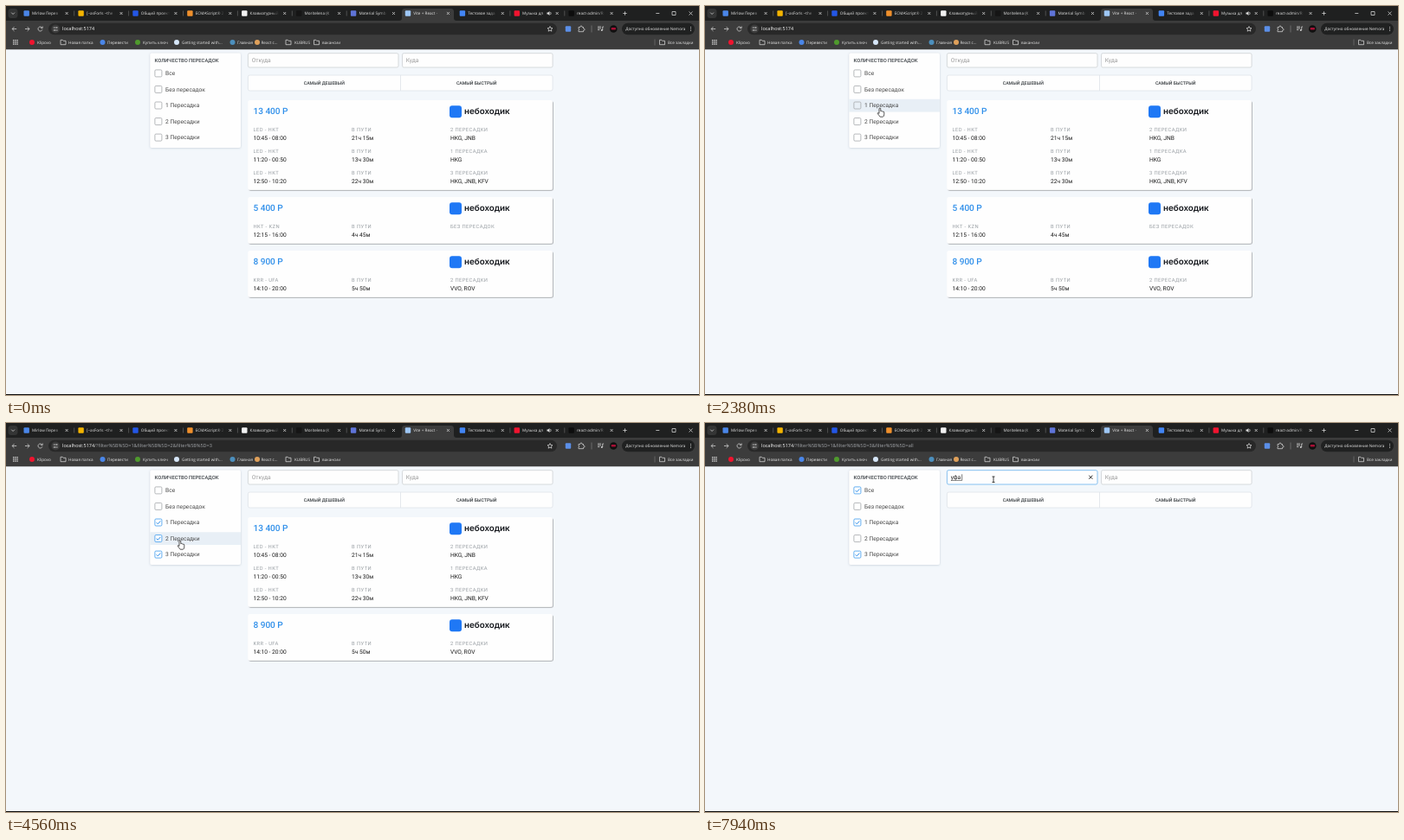
An HTML page for the animation above (8000 ms loop, 800 by 450 pixels).

```html
<!DOCTYPE html>
<html lang="ru">
<head>
<meta charset="utf-8">
<style>
html, body { margin: 0; width: 100%; height: 100%; overflow: hidden; background: #f3f7fb; }
svg { display: block; width: 800px; height: 450px; }
text { font-family: Roboto, sans-serif; font-size: 6.667px; text-rendering: geometricPrecision; white-space: pre; }
.ui text { font-family: "Open Sans", sans-serif; font-size: 4.65px; fill: #e6e6e6; }
.ui .url { font-size: 5.5px; fill: #fff; }
.line { fill: none; stroke: #d0d0d0; stroke-width: .8; }
.head { font-size: 5.83px; font-weight: 500; fill: #3c4146; }
.opt { fill: #4a4a4a; }
.hint { fill: #9a9a9a; }
.sort { font-size: 5.2px; font-weight: 500; fill: #33383c; text-anchor: middle; }
.price { font-size: 10.1px; font-weight: 500; fill: #2f8fea; }
.label { font-size: 5.83px; letter-spacing: .4px; fill: #999fa4; }
.value { fill: #1b1b1b; }
.brand { font-family: Inter, sans-serif; font-size: 9.8px; font-weight: 600; fill: #14171c; }
</style>
</head>
<body>
<svg viewBox="0 0 800 450">
  <defs>
    <filter id="soft" x="-10%" y="-10%" width="120%" height="125%">
      <feDropShadow dx="0" dy=".4" stdDeviation="1" flood-color="#62788c" flood-opacity=".35"/>
    </filter>
    <filter id="lift" x="-5%" y="-10%" width="110%" height="125%">
      <feDropShadow dx=".8" dy="1" stdDeviation=".6" flood-color="#000" flood-opacity=".32"/>
    </filter>
    <linearGradient id="fade"><stop stop-color="#1f2020" stop-opacity="0"/><stop offset="1" stop-color="#1f2020"/></linearGradient>
    <linearGradient id="fadeOn"><stop stop-color="#3c3c3c" stop-opacity="0"/><stop offset="1" stop-color="#3c3c3c"/></linearGradient>
  </defs>
  <rect width="800" height="450" fill="#f3f7fb"/>
  <rect y="449" width="800" height="1" fill="#0c0c0c"/>
  <g id="bars" class="ui"></g>
  <g id="panel"></g>
  <g id="form"></g>
  <g id="cards"></g>
  <g id="pointer"></g>
</svg>
<script>
const $ = id => document.getElementById(id);
const LOOP = 8000;
const text = (x, y, s, cls = '') => `<text x="${x}" y="${y}" class="${cls}">${s}</text>`;
const rect = (x, y, w, h, fill, r = 0, more = '') =>
  `<rect x="${x}" y="${y}" width="${w}" height="${h}" rx="${r}" fill="${fill}" ${more}/>`;
const dot = (x, y, r, fill) => `<circle cx="${x}" cy="${y}" r="${r}" fill="${fill}"/>`;
const line = (d, more = '') => `<path class="line" d="${d}" ${more}/>`;
const cross = (x, y, r, more) => line(`M${x - r} ${y - r}l${2 * r} ${2 * r}m0 ${-2 * r}l${-2 * r} ${2 * r}`, more);
const folder = x => line(`M${x - 3} 39.3h2.3l.8 1h2.9v4.4h-6z`);

// Browser window
const tabs = [
  ['Mirlow Перев', '#4a86e8'], ['[~asForIs ~the', '#f4b400'], ['Общий проект', '#2457e6'],
  ['ECMAScript® 2', '#f0902c'], ['Клавиатурный', '#f2f2f2'], ['Moritelena (К', '#151515'],
  ['Material Symb', '#5f74d8'], ['Vite + React - ', '#9ec7f5'], ['Тестовое зада', '#4285f4'],
  ['Музыка дл', '#f0142f'], ['react-admin/R', '#0d0d0d']
];
const marks = [
  [30, 36, 'Klipovo', '#f0142f'], [66, 72, 'Новая папка'], [111.5, 117, 'Перевести', '#4a86e8'],
  [152, 158, 'Купить ключ', '#4f9a2d'], [197, 203, 'Getting started with...', '#d6e6f8'],
  [261.5, 267, 'Главная', '#4c8fbd'], [290, 294.5, 'React с...', '#dfa05a'],
  [326, 333, 'KUBRUS'], [358.5, 365, 'вакансии'], [757.5, 764, 'Все закладки']
];

function drawBars() {
  let s = rect(0, 0, 800, 18, '#1f2020') + rect(0, 17, 800, 33.3, '#3c3c3c');
  s += rect(2.5, 3, 11, 11, '#343535', 3.5) + line('M6.2 7.6l1.9 1.9 1.9-1.9');
  tabs.forEach(([name, color], i) => {
    const x = 23.7 + i * 62.9, on = i === 7;
    if (on) s += `<path d="M454 17q3 0 3-3V6.5q0-3.5 3.5-3.5h53q3.5 0 3.5 3.5V14q0 3 3 3z" fill="#3c3c3c"/>`;
    else if (i !== 6 && i < 10) s += line(`M${x + 55} 5.5v6`, 'stroke-opacity=".35"');
    s += rect(x - 3.2, 5.3, 6.4, 6.4, color, 1) + text(x + 6.3, 10.2, name);
    s += rect(x + 30, 4, 10, 9, on ? 'url(#fadeOn)' : 'url(#fade)');
    s += rect(x + 39.9, 4, 6, 9, on ? '#3c3c3c' : '#1f2020');
    if (i === 9) s += `<path d="M624.5 7.5h1.3l1.7-1.5v5l-1.7-1.5h-1.3z" fill="#ddd"/>` + line('M628.6 7q1 1.5 0 3');
    s += cross(x + 46.4, 8.5, 1.5);
  });
  s += line('M712.3 8.5h4.4m-2.2-2.2v4.4M750.3 8.5h4M769 6.5h4v4h-4z') + cross(790.5, 8.5, 2);

  s += line('M12.2 26.5h-5m2.3-2.4l-2.4 2.4 2.4 2.4');
  s += line('M22 26.5h5m-2.3-2.4l2.4 2.4-2.4 2.4');
  s += line('M41.7 25.3a2.5 2.5 0 1 0 .2 2M42.2 23.5v2h-2');
  s += rect(49, 19.8, 587, 13.4, '#282828', 6.7) + dot(57.2, 26.5, 4.9, '#3c3c3c');
  s += line('M54.7 25h2.5m1.5 0h1M54.7 28h1m1.5 0h2.5') + dot(58.2, 25, .8, '#d0d0d0') + dot(56.2, 28, .8, '#d0d0d0');
  s += `<text class="url" x="65" y="28.4">localhost:5174<tspan id="query" fill="#a3a6aa"></tspan></text>`;
  s += line('M628 23.6l.9 1.9 2.1.2-1.6 1.4.5 2.1-1.9-1.1-1.9 1.1.5-2.1-1.6-1.4 2.1-.2z');
  s += rect(645.8, 23.3, 6.4, 6.4, '#5b8fe8', 1);
  s += line('M661 24.5h1.8q0-1.5 1.2-1.5t1.2 1.5h1.3v1.5q1.6 0 1.6 1.2t-1.6 1.2v1.3H661v-1.5q1.3-1.2 0-2.3z');
  s += line('M676 22.5v8', 'stroke-opacity=".4"');
  s += line('M683 24h4m-4 1.8h4m-4 1.8h2.3M688.7 28V24h1.4') + dot(687.8, 28.1, 1, '#d0d0d0');
  s += dot(701.3, 26.5, 4.3, '#101010') + rect(698.6, 25, 5.4, 2.4, '#a80f35', 1);
  s += rect(711, 19.8, 84, 13.4, '#202121', 6.7) + text(715.3, 28.2, 'Доступно обновление Nemora');
  for (const y of [24.5, 26.5, 28.5]) s += dot(790.5, y, .55, '#ddd');

  for (let i = 0; i < 9; i++) s += rect(8 + i % 3 * 2.2, 39 + Math.floor(i / 3) * 2.2, 1.4, 1.4, '#d0d0d0');
  for (const [x, tx, name, color] of marks)
    s += (color ? dot(x, 42, 3, color) : folder(x)) + text(tx, 43.6, name);
  s += line('M749 38.5v7', 'stroke-opacity=".35"');
  $('bars').innerHTML = s;
}

// Application state over time
const options = [['all', 'Все'], ['0', 'Без пересадок'], ['1', '1 Пересадка'], ['2', '2 Пересадки'], ['3', '3 Пересадки']];
const clicks = [[1250, '0'], [1810, '0'], [2620, '1'], [3400, '3'], [3780, '2'], [4640, '2'], [5200, 'all']];
const typed = [[6880, 'у'], [7250, 'уф'], [7440, 'уфа']];
const FOCUS = 6240, EMPTY = 7780;
// time, x, y of the pointer's hot spot
const path = [
  [760, 300, 150], [1060, 199, 95], [1900, 199, 95], [2200, 202, 118], [2750, 202, 118], [3070, 199, 150],
  [3470, 199, 150], [3700, 201, 136], [4720, 201, 136], [5040, 199, 77], [5450, 199, 77], [6130, 333, 65]
];
const flights = [
  ['13 400 Р', [['LED - HKT', '10:45 - 08:00', '21ч 15м', 'HKG, JNB'],
    ['LED - HKT', '11:20 - 00:50', '13ч 30м', 'HKG'],
    ['LED - HKT', '12:50 - 10:20', '22ч 30м', 'HKG, JNB, KFV']]],
  ['5 400 Р', [['HKT - KZN', '12:15 - 16:00', '4ч 45м', '']]],
  ['8 900 Р', [['KRR - UFA', '14:10 - 20:00', '5ч 50м', 'VVO, ROV']]]
];
const stops = row => row[3] ? row[3].split(', ').length : 0;
const stopLabel = n => ['БЕЗ ПЕРЕСАДОК', '1 ПЕРЕСАДКА', '2 ПЕРЕСАДКИ', '3 ПЕРЕСАДКИ'][n];

function filtersAt(t) {
  const set = new Set();
  for (const [at, id] of clicks) if (t >= at && !set.delete(id)) set.add(id);
  return [...set].sort();
}

function pointerAt(t) {
  if (t < path[0][0]) return null;
  const i = path.findIndex(p => p[0] > t);
  if (i < 0) return path[path.length - 1].slice(1);
  const [a, ax, ay] = path[i - 1], [b, bx, by] = path[i];
  const u = (t - a) / (b - a), k = u * u * (3 - 2 * u);
  return [ax + (bx - ax) * k, ay + (by - ay) * k];
}

// Views
function panelView(on, hover) {
  let s = rect(166.3, 54.5, 104.7, 109.5, '#fefefe', 2, 'filter="url(#soft)"') + text(171.6, 65.1, 'КОЛИЧЕСТВО ПЕРЕСАДОК', 'head');
  options.forEach(([id, name], i) => {
    const y = 77.9 + i * 18.55, set = on.includes(id);
    if (i === hover) s += rect(166.3, y - 7.3, 104.7, 14.8, '#e8eff6');
    s += rect(171.9, y - 4, 8, 8, set ? '#fff' : 'none', 1.2, `stroke="${set ? '#3d9bee' : '#a5a8ab'}" stroke-width=".8"`);
    if (set) s += `<path d="M173.7 ${y + .1}l1.6 1.7 3-3.4" fill="none" stroke="#2f8fea" stroke-width="1"/>`;
    s += text(184, y + 2.1, name, 'opt');
  });
  return s;
}

function formView(focus, value, caret) {
  const field = (x, edge) => rect(x, 54.7, 173.6, 16.3, '#fefefe', 1.8, `stroke="${edge}" stroke-width=".8"`);
  let s = field(279.4, focus ? '#69b2ec' : '#cdd1d4') + field(457.5, '#cdd1d4') + text(461.7, 65.1, 'Куда', 'hint');
  s += value ? text(283.7, 65.1, value, 'value') : text(283.7, 65.1, 'Откуда', 'hint');
  if (value) {
    s += rect(283.9, 66.4, value.length * 4.2, .6, '#444') + cross(445.3, 62.7, 2, 'style="stroke:#222;stroke-width:1"');
  }
  if (caret) s += rect(283.6 + value.length * 4.3, 59.3, .6, 7.2, '#222');
  s += rect(279.4, 80, 351.7, 18, '#fefefe', 2, 'stroke="#dde3e9" stroke-width=".8"');
  s += rect(455.1, 80, .8, 18, '#dde3e9');
  return s + text(367.3, 90.9, 'САМЫЙ ДЕШЕВЫЙ', 'sort') + text(543.2, 90.9, 'САМЫЙ БЫСТРЫЙ', 'sort');
}

function cardsView(on) {
  const every = !on.length || on.includes('all');
  let s = '', y = 109;
  for (const [price, all] of flights) {
    const rows = all.filter(r => every || on.includes(String(stops(r))));
    if (!rows.length) continue;
    const h = 28.8 + rows.length * 25;
    s += rect(279.2, y, 351.8, h, '#fefefe', 2.5, 'filter="url(#lift)"');
    s += text(285.4, y + 15.9, price, 'price');
    s += rect(512, y + 6.2, 14, 14, '#1f78f5', 3) + text(529, y + 16.1, 'небоходик', 'brand');
    rows.forEach((r, i) => {
      const ly = y + 36 + i * 25;
      [[285.4, r[0], r[1]], [399.1, 'В ПУТИ', r[2]], [512.9, stopLabel(stops(r)), r[3]]].forEach(([x, a, b]) => {
        s += text(x, ly, a, 'label') + text(x, ly + 9.7, b, 'value');
      });
    });
    y += h + 8.2;
  }
  return s;
}

const shapes = {
  hand: '<path d="M-1 1q0-1 .9-1t.9 1v2.7q.8-.5 1.4.2.8-.4 1.3.3 1.3-.3 1.3 1v2q0 2.3-1.3 3h-3.3q-1-1.2-2.9-3.7-.2-1 .7-.9l1 .8z" fill="#fff" stroke="#111" stroke-width=".7"/>',
  arrow: '<path d="M0 0v7.5l1.8-1.7 1.2 2.7 1.2-.5-1.2-2.6h2.4z" fill="#fff" stroke="#111" stroke-width=".6"/>',
  beam: '<path d="M-1.5-3h3M0-3v6.5M-1.5 3.5h3" fill="none" stroke="#111" stroke-width=".8"/>'
};

const shown = {};
function put(id, key, make) {
  if (shown[id] === key) return;
  shown[id] = key;
  $(id).innerHTML = make();
}

function render(t) {
  const on = filtersAt(t), p = pointerAt(t);
  const inside = p && p[0] > 166 && p[0] < 271 && p[1] > 70 && p[1] < 160;
  const row = inside ? Math.round((p[1] - 77.9) / 18.55) : -1;
  const overField = p && p[0] > 279 && p[0] < 453 && p[1] > 54 && p[1] < 71;
  const focus = t >= FOCUS;
  const value = typed.reduce((v, [at, s]) => t >= at ? s : v, '');
  const caret = focus && (value ? true : t >= 6500 && t < 7000);

  put('query', on.join(), () => on.length ? '/?' + on.map(f => 'filter%5B%5D=' + f).join('&amp;') : '');
  put('panel', on + '|' + row, () => panelView(on, row));
  put('form', [focus, value, caret].join(), () => formView(focus, value, caret));
  put('cards', t >= EMPTY ? 'none' : 'f' + on, () => t >= EMPTY ? '' : cardsView(on));
  put('pointer', p ? inside ? 'hand' : overField ? 'beam' : 'arrow' : '', () => p ? shapes[shown.pointer] : '');
  if (p) $('pointer').setAttribute('transform', `translate(${p[0].toFixed(2)} ${p[1].toFixed(2)})`);
}

drawBars();
const start = performance.now();
function tick() {
  render((performance.now() - start) % LOOP);
  requestAnimationFrame(tick);
}
render(0);
requestAnimationFrame(tick);
</script>
</body>
</html>
```
